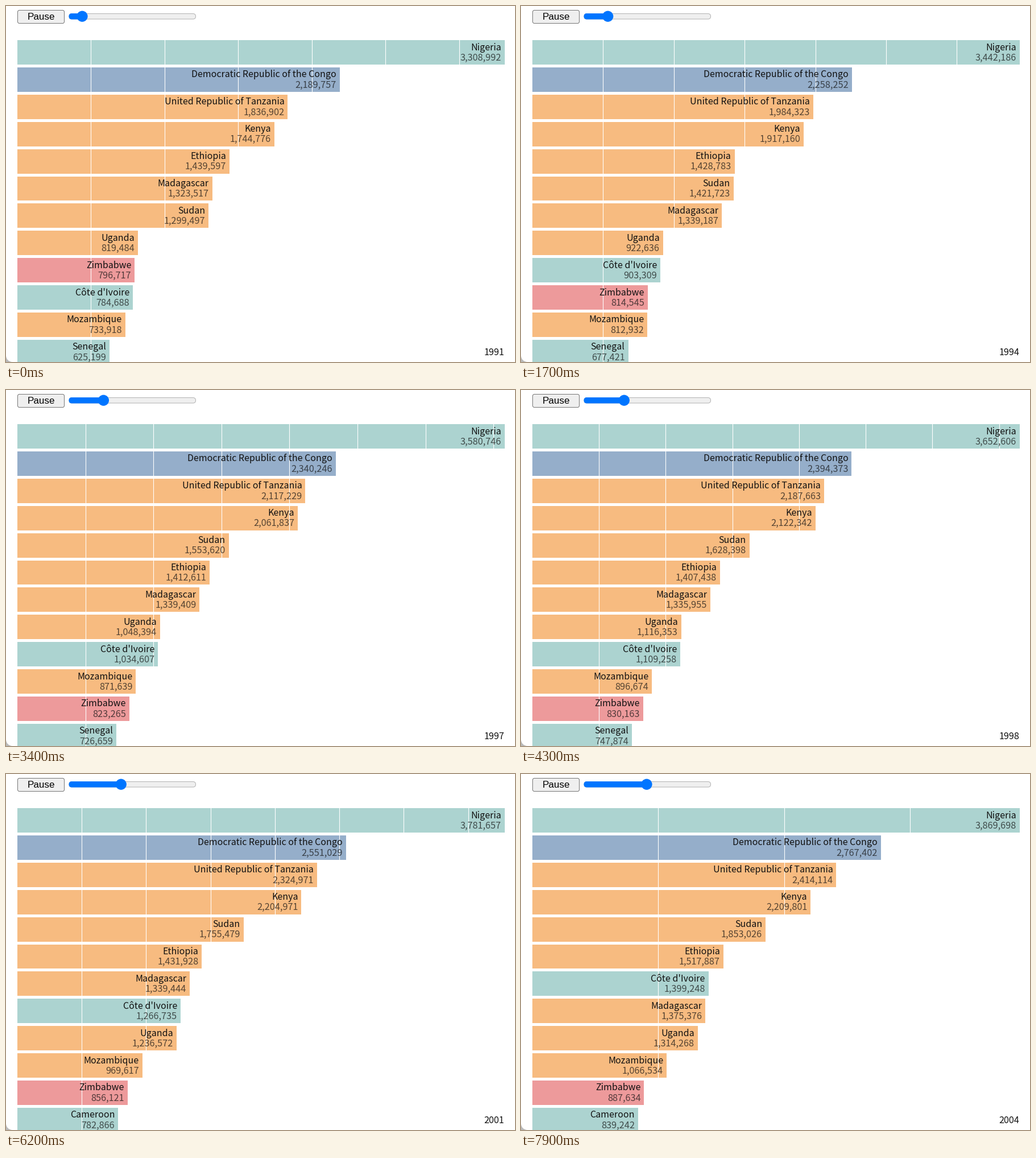
A matplotlib script that plays this animation: 895x626 px, repeating every 8 s.

```python
import matplotlib.pyplot as plt
import numpy as np
from matplotlib.animation import FuncAnimation
from matplotlib.patches import Circle, FancyBboxPatch, PathPatch, Rectangle
from matplotlib.path import Path

W, H, DPI = 895, 626, 100
FRAMES, STEP_MS = 80, 100
LEFT, SPAN = 20, 856.5               # bar origin and full bar length
TOP, ROW, BAR = 60.2, 47.88, 42.9    # first row, row pitch, bar height
YEAR0, YEARS_PER_S = 1991.6, 1.627
KEY = 0.1 / YEARS_PER_S              # ranks are settled ten times a year
TEAL, BLUE, ORANGE, RED = "#76b7b2", "#4e79a7", "#f28e2b", "#e15759"
SANS = "Noto Sans CJK JP"

TIMES = np.array([0, 1.1, 2.4, 4.3, 5.4, 6.9, 7.9])
COUNTRIES = {
    "Nigeria": (TEAL, 3308992, 3393941, 3499205, 3652606, 3736038, 3817132, 3869698),
    "Democratic Republic of the Congo":
        (BLUE, 2189757, 2232694, 2290517, 2394373, 2479411, 2627063, 2767402),
    "United Republic of Tanzania":
        (ORANGE, 1836902, 1936073, 2038260, 2187663, 2271796, 2365703, 2414114),
    "Kenya": (ORANGE, 1744776, 1858235, 1981491, 2122342, 2179788, 2215133, 2209801),
    "Ethiopia": (ORANGE, 1439597, 1433246, 1423104, 1407438, 1414440, 1458331, 1517887),
    "Madagascar": (ORANGE, 1323517, 1335292, 1341510, 1335955, 1334157, 1349749, 1375376),
    "Sudan": (ORANGE, 1299497, 1379871, 1471608, 1628398, 1711620, 1791490, 1853026),
    "Uganda": (ORANGE, 819484, 883187, 971792, 1116353, 1189088, 1272932, 1314268),
    "Zimbabwe": (RED, 796717, 810623, 817797, 830163, 843654, 868433, 887634),
    "Côte d'Ivoire": (TEAL, 784688, 859703, 956245, 1109258, 1207148, 1317740, 1399248),
    "Mozambique": (ORANGE, 733918, 785347, 842516, 896674, 938078, 1002851, 1066534),
    "Senegal": (TEAL, 625199, 658757, 698605, 747874, 765990, 790500, 806000),
    "Cameroon": (TEAL, 590000, 622000, 663000, 727000, 760290, 803820, 839242),
}
DATA = np.array([c[1:] for c in COUNTRIES.values()], float)
SLOPES = np.gradient(DATA, TIMES, axis=1)


def values(t):
    """Cubic Hermite interpolation of every country at t seconds."""
    i = int(np.clip(np.searchsorted(TIMES, t, "right") - 1, 0, len(TIMES) - 2))
    h = TIMES[i + 1] - TIMES[i]
    u = (t - TIMES[i]) / h
    return ((2 * u**3 - 3 * u**2 + 1) * DATA[:, i]
            + (3 * u**2 - 2 * u**3) * DATA[:, i + 1]
            + h * (u**3 - 2 * u**2 + u) * SLOPES[:, i]
            + h * (u**3 - u**2) * SLOPES[:, i + 1])


def ranks(k):
    return np.argsort(np.argsort(-values(k * KEY)))


def rows(t):
    """Rank positions, sliding linearly between neighbouring keyframes."""
    k = int(t / KEY)
    u = t / KEY - k
    return (1 - u) * ranks(k) + u * ranks(k + 1)


def px(n):
    return n * 72 / DPI


# The small margin keeps the pixel size from being rounded down
fig = plt.figure(figsize=((W + 0.01) / DPI, (H + 0.01) / DPI), dpi=DPI,
                 facecolor="white")
ax = fig.add_axes([0, 0, 1, 1])
ax.set_xlim(0, W)
ax.set_ylim(H, 0)
ax.axis("off")


def text(x, y, s="", size=16, color="#111111", ha="right", font=SANS, **kw):
    return ax.text(x, y, s, fontsize=px(size), color=color, ha=ha,
                   va="baseline", family=font, zorder=4, **kw)


def pill(x, y, w, h, r, fill, edge, z=1):
    p = FancyBboxPatch((x + r, y + r), w - 2 * r, h - 2 * r,
                       boxstyle=f"round,pad={r}", fc=fill, ec=edge,
                       lw=px(1), zorder=z)
    return ax.add_patch(p)


# Controls
pill(20.5, 7.5, 82, 23, 3, "#efefef", "#767676")
text(61.7, 24, "Pause", 17, "black", "center", "Liberation Sans")
pill(111, 13.5, 222.5, 9.5, 4.7, "#efefef", "#b2b2b2")
filled = pill(111, 13.5, 20, 9.5, 4.7, "#0075ff", "#0075ff", 2)
knob = ax.add_patch(Circle((134, 18.2), 9.6, fc="#0075ff", ec="none", zorder=3))

# Rounded window corner
corner = Path([(0, 615), (0, 626), (11, 626), (1, 625), (0, 615)],
              [Path.MOVETO, Path.LINETO, Path.LINETO, Path.CURVE3, Path.CURVE3])
ax.add_patch(PathPatch(corner, fc="#b9b9b9", ec="none", zorder=5))

bars, names, counts = [], [], []
for name, (color, *_) in COUNTRIES.items():
    bars.append(ax.add_patch(Rectangle((LEFT, 0), 1, BAR, fc=color, ec="none",
                                       alpha=0.6, zorder=1)))
    names.append(text(0, 0, name, clip_on=True))
    counts.append(text(0, 0, size=16.3, alpha=0.7, clip_on=True))
grid = [ax.plot([0, 0], [TOP, H], color="white", lw=px(1.1), zorder=2)[0]
        for _ in range(7)]
year = text(876, 614, size=16.2)


def update(frame):
    t = frame * STEP_MS / 1000
    vals = values(t)
    scale = SPAN / vals.max()

    for v, r, bar, name, count in zip(vals, rows(t), bars, names, counts):
        y, end = TOP + r * ROW, LEFT + v * scale
        bar.set_y(y)
        bar.set_width(end - LEFT)
        name.set_position((end - 6, y + 17.4))
        count.set_position((end - 6, y + 35.6))
        count.set_text(f"{v:,.0f}")

    # Spacing doubles once five-odd ticks no longer fit the nice-step rule
    step = 5e5 if vals.max() / 5.356 < 5e5 * 2**0.5 else 1e6
    for i, line in enumerate(grid, 1):
        line.set_xdata([LEFT + i * step * scale] * 2)
        line.set_visible(i * step <= vals.max())

    x = 134 + 11.01 * t
    knob.center = (x, 18.2)
    filled.set_width(x - 111 - 9.4)
    year.set_text(str(int(YEAR0 + YEARS_PER_S * t)))
    return []


anim = FuncAnimation(fig, update, frames=FRAMES, interval=STEP_MS,
                     repeat=True, repeat_delay=0, blit=False)
plt.show()
```
